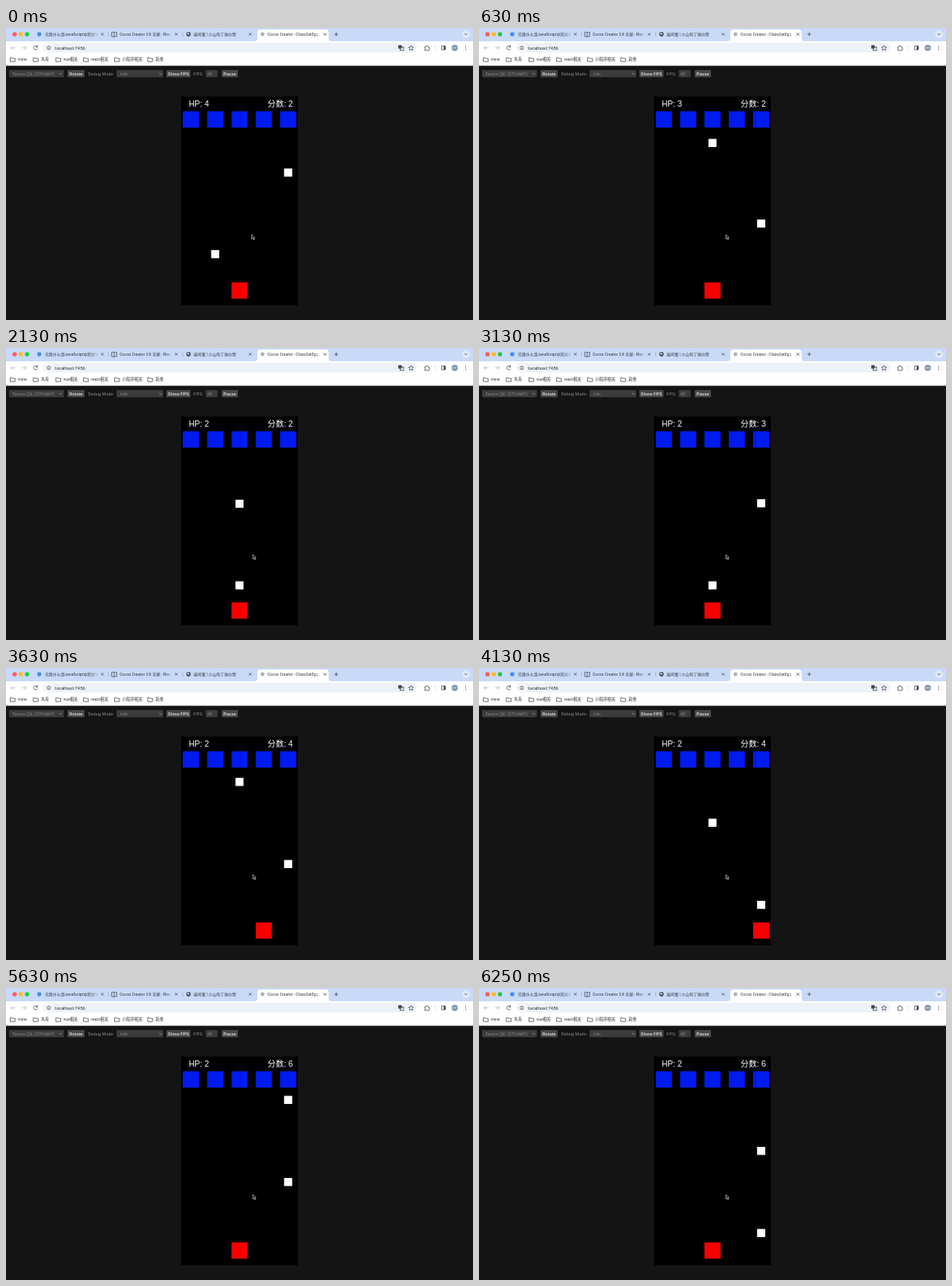
An HTML page that plays this animation: 600 by 375 pixels, repeating every 6.37 s.

```html
<!DOCTYPE html>
<html lang="zh">
<head>
<meta charset="utf-8">
<title>Egg catcher</title>
<style>
  html, body { margin: 0; width: 100%; height: 100%; overflow: hidden; background: #141414; }
  svg { display: block; }
  text { font-family: Roboto, "Noto Sans CJK SC", "Noto Sans CJK", sans-serif; white-space: pre; }
  .tab { font-size: 5.1px; fill: #30343b; }
  .mark { font-size: 5.2px; fill: #2b2d31; }
  .page { font-size: 5.6px; fill: #8b8b8b; font-family: "Liberation Sans", Arial, sans-serif; }
  .bold { font-weight: bold; fill: #d4d4d4; }
  .hud { font-size: 10.5px; fill: #fff; font-family: "Liberation Sans", "Noto Sans CJK SC", "Noto Sans CJK", sans-serif; }
  .icon { fill: none; stroke: #474b52; stroke-width: .8; }
  .pale { stroke: #b4b7bc; }
</style>
</head>
<body>
<svg width="600" height="375" viewBox="0 0 600 375">
  <defs>
    <linearGradient id="fadeBlue"><stop stop-color="#c9daf8" stop-opacity="0"/><stop offset="1" stop-color="#c9daf8"/></linearGradient>
    <linearGradient id="fadeWhite"><stop stop-color="#fff" stop-opacity="0"/><stop offset="1" stop-color="#fff"/></linearGradient>
    <clipPath id="stage"><rect x="225" y="88" width="150" height="268"/></clipPath>
  </defs>

  <!-- tab strip -->
  <rect width="600" height="18" fill="#c9daf8"/>
  <circle cx="11" cy="8" r="2.8" fill="#fe5f57"/>
  <circle cx="19" cy="8" r="2.8" fill="#febc2e"/>
  <circle cx="27" cy="8" r="2.8" fill="#28c840"/>
  <path d="M319 17q4 0 4-4V6q0-4 4-4h83.500q4 0 4 4v7q0 4 4 4z" fill="#fff"/>
  <path class="icon" d="M131.500 5v6M227 5v6" stroke-width=".5" style="stroke:#9dafd0"/>
  <g id="tabs"></g>
  <circle cx="42.700" cy="8" r="2.700" fill="#4a8af4"/>
  <path class="icon" d="M139 6v5.500M139 6q-1.500-1-3.200-.600v5.500q1.700-.400 3.200.600q1.500-1 3.200-.600V5.400q-1.700-.400-3.200.600"/>
  <circle cx="234.500" cy="8" r="2.900" fill="#4b5058"/>
  <path d="M232.500 7l2-1 1 1.500-1.500 1.500zM235.500 9.500l1-1 .3 1z" fill="#c9daf8"/>
  <circle cx="329.500" cy="8" r="2.400" fill="#a9adb3"/>
  <path class="icon" d="M421.800 8h5M424.300 5.500v5"/>
  <circle cx="591" cy="8" r="5" fill="#dfe9fc"/>
  <path class="icon" d="M589 7l2 2 2-2"/>

  <!-- address bar -->
  <rect y="17" width="600" height="32" fill="#fff"/>
  <g class="icon pale"><path d="M12 25.500H6.500M9 23l-2.500 2.500L9 28M20.500 25.500H26M23.500 23l2.500 2.500-2.500 2.500"/></g>
  <path class="icon" d="M40 24a2.500 2.500 0 1 0 .3 2.500M40.500 22.300v2.200h-2.200"/>
  <rect x="48" y="19" width="480" height="12.600" rx="6.300" fill="#edf1fa"/>
  <circle cx="55" cy="25.500" r="4.500" fill="#fff"/>
  <circle class="icon" cx="55" cy="25.500" r="2.400" stroke-width=".6"/>
  <path class="icon" d="M55 25v2M55 23.900v.6" stroke-width=".6"/>
  <text x="63" y="27.500" font-size="5.900" fill="#25282d">localhost:7456</text>
  <rect class="icon" x="506.500" y="24.500" width="4.300" height="4.300" stroke-width=".7"/>
  <rect x="504" y="22" width="4.500" height="4.500" rx=".5" fill="#474b52"/>
  <path class="icon" d="M520.500 22.300l1 2.200 2.300.2-1.700 1.600.5 2.300-2.100-1.200-2.100 1.200.5-2.300-1.700-1.600 2.300-.2z" stroke-width=".7"/>
  <path class="icon" d="M538 24h1.600q0-1.500 1-1.500t1 1.500h1.600v1.600q1.300 0 1.300 1t-1.300 1V28.800H538v-1.500q1 0 1-.9t-1-.9z"/>
  <path d="M551.500 22v7" stroke="#c9daf8" stroke-width=".7"/>
  <rect class="icon" x="559.500" y="23" width="5" height="5" rx=".5"/>
  <path d="M562.300 23h2.200v5h-2.200z" fill="#474b52"/>
  <circle cx="576.500" cy="25.500" r="4" fill="#8299b5"/>
  <path d="M574 25.500h5" stroke="#c7d3e2" stroke-width="1.200"/>
  <g fill="#474b52"><circle cx="590.500" cy="23.300" r=".6"/><circle cx="590.500" cy="25.500" r=".6"/><circle cx="590.500" cy="27.700" r=".6"/></g>
  <g id="bookmarks"></g>

  <!-- preview controls -->
  <rect y="48.500" width="600" height="326.500" fill="#141414"/>
  <g id="controls"></g>
  <path d="M68.500 57.800l1.700 1.700 1.700-1.700M196.800 57.800l1.700 1.700 1.700-1.700" fill="none" stroke="#a0a0a0" stroke-width=".8"/>

  <!-- game -->
  <g clip-path="url(#stage)">
    <rect x="225" y="88" width="150" height="268"/>
    <g id="hens"></g>
    <rect id="basket" y="326.700" width="20.800" height="20.900" fill="#f60000"/>
    <g id="eggs"></g>
    <text class="hud" id="hp" x="234.700" y="100.500"></text>
    <text class="hud" id="score" x="368.700" y="100.500" text-anchor="end"></text>
  </g>
  <path id="cursor" d="M0 0v5.800l1.400-1.300 1 2.200 1-.5-1-2.100h1.800z" fill="#111" stroke="#e8e8e8" stroke-width=".6"/>
</svg>
<script>
const $ = id => document.getElementById(id);
const colX = col => 300 + (col - 3) * 31.25;

const tabs = [
  [50, 118, '究竟什么是JavaScript中的对象', 'Blue'],
  [146, 213, 'Cocos Creator 3.8 手册 - Blen', 'Blue'],
  [241, 308, '接鸡蛋 | 小山布丁球の窝', 'Blue'],
  [336, 404, 'Cocos Creator - ClassGetEgg', 'White'],
];
$('tabs').innerHTML = tabs.map(([x, end, label, fade]) => `
  <svg x="${x}" width="${end - x}" height="17"><text class="tab" y="9.900">${label}</text></svg>
  <rect x="${end - 8}" y="3" width="8.500" height="11" fill="url(#fade${fade})"/>
  <path class="icon" d="M${end + 4} 6.300l3.400 3.400m0-3.400l-3.400 3.400"/>`).join('');

const bookmarks = [[5.5, 'mine'], [35, '木舟'], [64, 'vue相关'], [99.5, 'react相关'], [139.5, '小程序相关'], [182, '其他']];
$('bookmarks').innerHTML = bookmarks.map(([x, label]) => `
  <path class="icon" d="M${x} 38.200h2.300l.8.900h3.200v4H${x}z"/>
  <text class="mark" x="${x + 9.8}" y="42.300">${label}</text>`).join('');

const box = (x, w, fill) => `<rect x="${x}" y="54" width="${w}" height="9.300" rx="1" fill="${fill}"/>`;
const label = (x, text, cls = '') => `<text class="page ${cls}" x="${x}" y="60.600">${text}</text>`;
const button = (x, w, text) => box(x, w, '#484848') +
  `<text class="page bold" x="${x + w / 2}" y="60.600" text-anchor="middle">${text}</text>`;
$('controls').innerHTML =
  box(4, 70.5, '#3b3b3b') + label(8, 'Tavoro QE (375X667)') + button(79, 22, 'Rotate') +
  label(105.5, 'Debug Mode:') + box(142, 60, '#3b3b3b') + label(147, 'Info') +
  button(206, 31, 'Show FPS') + label(241, 'FPS:') + box(256.5, 15.5, '#3b3b3b') + label(259, '60') +
  button(277, 21, 'Pause');

$('hens').innerHTML = [1, 2, 3, 4, 5].map(col =>
  `<rect x="${colX(col) - 10.4}" y="107" width="20.800" height="20.800" fill="#001bee"/>`).join('');

// Times below are in picture steps of 125 ms.
const LOOP = 6370, STEP = 125, FALL = 13.1, SPAWN_Y = 117.5;
const eggs = [
  { col: 2, born: -13.2, gone: 5, missed: true },
  { col: 5, born: -5.2, gone: 13, missed: true },
  { col: 3, born: 2.7, gone: 19 },
  { col: 3, born: 10.7, gone: 27 },
  { col: 5, born: 18.75, gone: 35 },
  { col: 3, born: 26.8, gone: 43 },
  { col: 5, born: 34.95, gone: 51 },
  { col: 5, born: 43, gone: 59 },
];
const basketMoves = [[0, 3], [6, 2], [12, 3], [29, 4], [31, 5], [36, 4], [37, 3], [39, 2], [42, 3]];

function draw(ms) {
  const n = Math.floor(Math.floor(ms / 10) * 10 / STEP);
  const done = eggs.filter(egg => n >= egg.gone);
  const missed = done.filter(egg => egg.missed).length;
  $('hp').textContent = `HP: ${4 - missed}`;
  $('score').textContent = `分数: ${2 + done.length - missed}`;
  $('basket').setAttribute('x', colX(basketMoves.findLast(([at]) => n >= at)[1]) - 10.4);
  $('eggs').innerHTML = eggs.filter(egg => n >= egg.born && n < egg.gone).map(egg =>
    `<rect x="${colX(egg.col) - 5.2}" y="${SPAWN_Y + (n - egg.born) * FALL - 5.2}" width="10.400" height="10.400" fill="#fff"/>`).join('');
  $('cursor').setAttribute('transform', `translate(${n < 5 ? 315.6 : 317.1} 265.300)`);
}

function tick() {
  draw(performance.now() % LOOP);
  requestAnimationFrame(tick);
}
tick();
</script>
</body>
</html>
```
